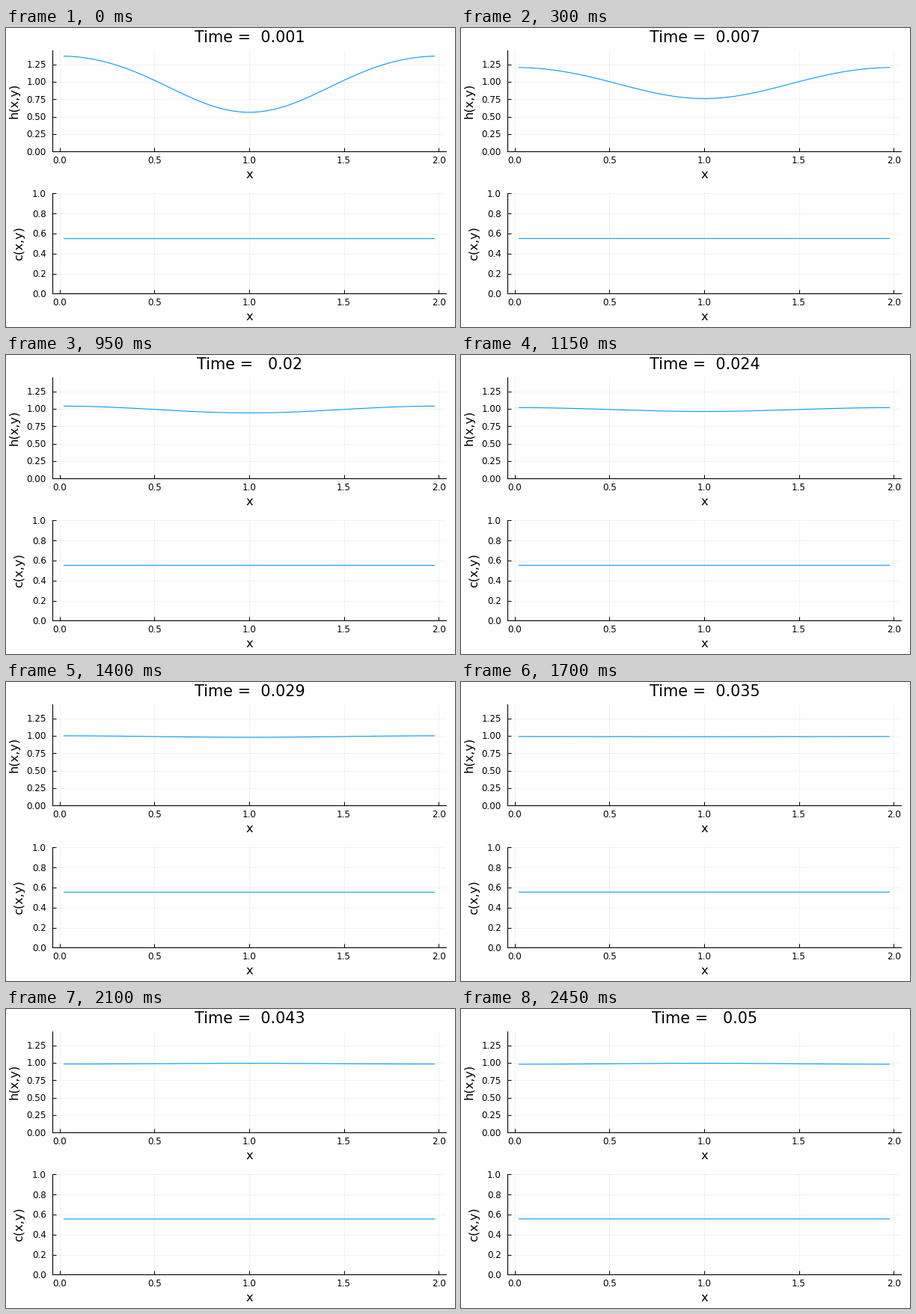
A matplotlib script that plays this animation: 600x400 px, repeating every 2.5 s.

```python
import numpy as np
import matplotlib.pyplot as plt
from matplotlib.animation import FuncAnimation

W, H, DPI = 600, 400, 100
FRAMES, INTERVAL = 50, 50
LEFT, RIGHT = 62, 588
X_LIM = (-0.0388, 2.0388)
BLUE = "#009afa"


def pt(px):
    return px * 72 / DPI


plt.rcParams["font.family"] = "DejaVu Sans"
fig = plt.figure(figsize=(W / DPI, H / DPI), dpi=DPI, facecolor="white")


def label(x, y, text, size, **kw):
    """Place text by its baseline, in pixels from the top left."""
    kw = {"ha": "center", "va": "baseline", **kw}
    return fig.text(x / W, 1 - y / H, text, fontsize=pt(size), color="black", **kw)


def panel(top, bottom, y_max, y_ticks, y_format, name, name_x):
    ax = fig.add_axes([LEFT / W, 1 - bottom / H, (RIGHT - LEFT) / W, (bottom - top) / H])
    ax.set(xlim=X_LIM, ylim=(0, y_max))
    x_ticks = np.arange(0, 2.1, 0.5)
    ax.set_xticks(x_ticks)
    ax.set_yticks(y_ticks)
    ax.set_axisbelow(True)
    ax.grid(color="black", alpha=0.05, linewidth=pt(1))
    ax.tick_params(direction="in", length=pt(5), width=pt(1),
                   labelleft=False, labelbottom=False)
    for side, spine in ax.spines.items():
        spine.set_visible(side in ("left", "bottom"))
        spine.set_linewidth(pt(1.1))

    x_scale = (RIGHT - LEFT) / (X_LIM[1] - X_LIM[0])
    for v in x_ticks:
        label(LEFT + (v - X_LIM[0]) * x_scale, bottom + 15.8, f"{v:.1f}", 11.9)
    for v in y_ticks:
        y = bottom - v * (bottom - top) / y_max
        label(54, y + 4.3, format(v, y_format), 11.9, ha="right")
    label(325, bottom + 36, "x", 16.3)
    label(name_x, (top + bottom) / 2 - 0.5, name, 16.3,
          rotation=90, rotation_mode="anchor")
    line, = ax.plot([], [], color=BLUE, linewidth=pt(1.1),
                    solid_capstyle="butt", snap=False)
    return line


height_line = panel(30.45, 165.45, 1.447, np.arange(0, 1.3, 0.25), ".2f", "h(x,y)", 15.6)
conc_line = panel(221.45, 355.45, 1.0, np.arange(0, 1.1, 0.2), ".1f", "c(x,y)", 22.4)
title = label(326, 19, "", 20.8)

x = np.linspace(0.02, 1.98, 50)


def film_height(t):
    """Levelling film: a decaying cosine, its slaved harmonic, slow evaporation."""
    s = t - 0.001
    a = 0.411 * np.exp(-92.5 * s - 640 * s * s) - 0.0075
    b = -0.21 * a * a / (1 + 1.5 * a * a)
    mean = 0.9955 - 0.15 * t
    return mean + a * np.cos(np.pi * x) + b * np.cos(2 * np.pi * x)


def update(i):
    t = round((i + 1) * 0.001, 3)
    title.set_text(f"Time = {t!s:>6}")
    height_line.set_data(x, film_height(t))
    conc_line.set_data(x, np.full_like(x, 0.55 + 0.14 * t))
    return title, height_line, conc_line


anim = FuncAnimation(fig, update, frames=FRAMES, interval=INTERVAL,
                     repeat=True, repeat_delay=0, blit=False)
plt.show()
```
